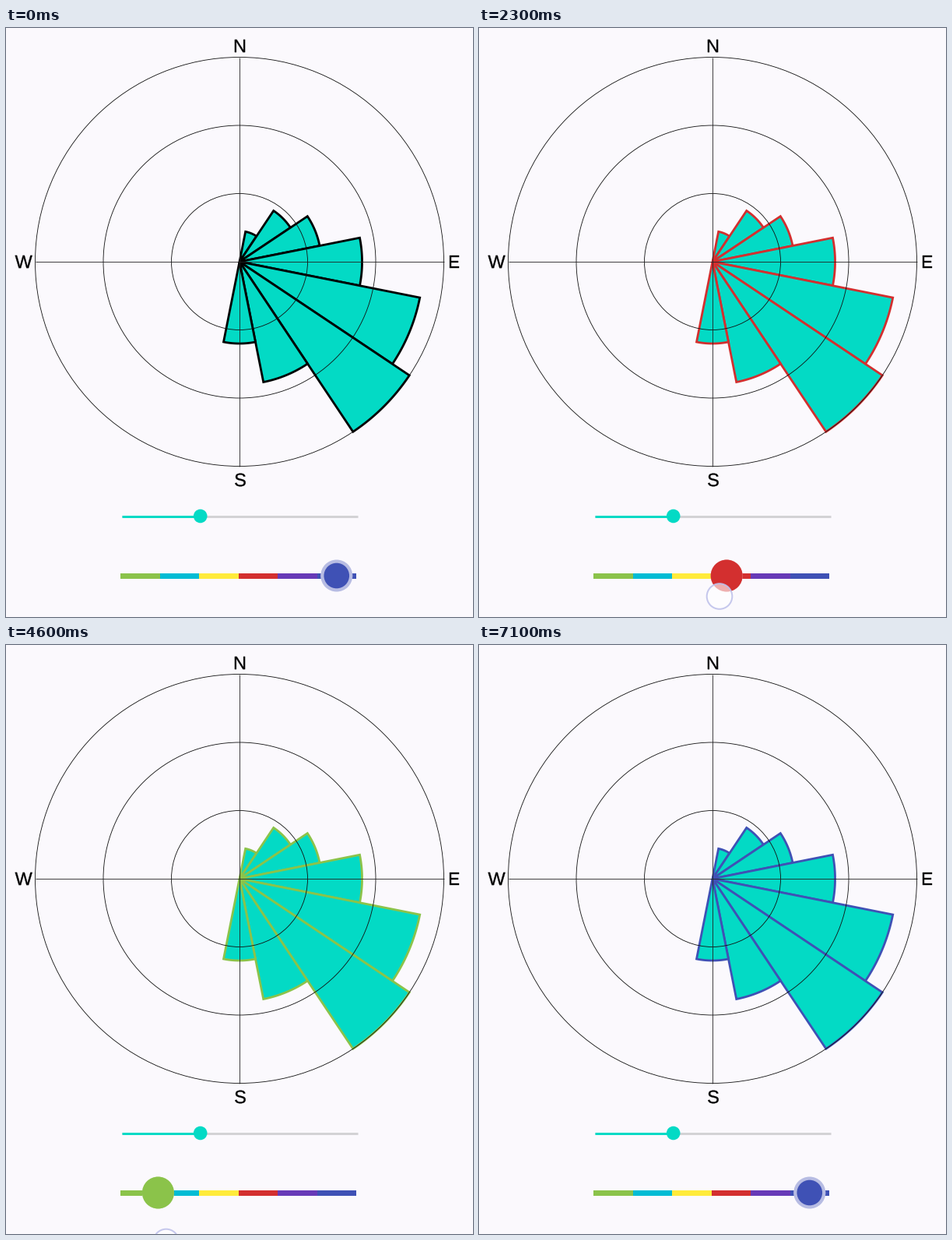
Animation of 600x756 px, one loop 9800 ms. Source, as a matplotlib script:

```python
import numpy as np
import matplotlib.pyplot as plt
from matplotlib.animation import FuncAnimation
from matplotlib.patches import Circle, PathPatch, Rectangle
from matplotlib.path import Path
from matplotlib.textpath import TextPath
from matplotlib.transforms import Affine2D

W, H, DPI = 600, 756, 100
FRAMES, STEP = 98, 100
PX = 72 / DPI  # one pixel in points

BG = "#fbf9fd"
TEAL = "#03dac5"
PALETTE = ["#8bc34a", "#00bcd4", "#ffeb3b", "#d32f2f", "#673ab7", "#3f51b5"]

CX, CY, R = 300, 300, 262.5
SECTOR = 22.5
VALUES = [0.15, 0.3, 0.4, 0.6, 0.9, 1.0, 0.6, 0.4]  # clockwise from NNE

TRACK_X, TRACK_Y, TRACK_W, TRACK_H = 147, 703, 303, 7
SEG = TRACK_W / len(PALETTE)
THUMB_MIN, THUMB_MAX = TRACK_X + SEG / 2, TRACK_X + TRACK_W - SEG / 2
THUMB_R, HALO_R = 16.3, 20.5

# Finger path: time in ms, x, y
TOUCH = np.array([
    (1200, 423.5, 690.5), (1300, 423.5, 692), (2300, 309, 729.5),
    (3100, 219, 753), (3600, 166, 763.5), (3800, 150, 767),
    (4000, 143, 769), (4100, 143, 769), (4400, 180, 768),
    (5100, 270, 761), (5400, 306, 757.5), (6100, 387, 745.5),
    (6400, 420, 740), (6700, 434, 737), (7000, 439, 736),
])
TOUCH_START, TOUCH_END, LAG = 1200, 7100, 80

fig = plt.figure(figsize=(W / DPI, H / DPI), dpi=DPI, facecolor=BG)
ax = fig.add_axes([0, 0, 1, 1])
ax.set_xlim(0, W)
ax.set_ylim(H, 0)
ax.axis("off")


def wedge_path(index, value):
    start = (index + 0.5) * SECTOR
    a = np.radians(np.linspace(start, start + SECTOR, 40))
    arc = np.column_stack([CX + value * R * np.sin(a), CY - value * R * np.cos(a)])
    return Path(np.vstack([(CX, CY), arc, (CX, CY)]))


def line(xs, ys, color, width, z):
    ax.plot(xs, ys, color=color, lw=width * PX, zorder=z, solid_capstyle="butt")


def disc(x, y, r, z, **style):
    return ax.add_patch(Circle((x, y), r, zorder=z, **style))


def letter(char, x, y, size=23.5):
    path = TextPath((0, 0), char, size=size, prop={"family": "Liberation Sans"})
    box = path.get_extents()
    mx, my = (box.x0 + box.x1) / 2, (box.y0 + box.y1) / 2
    move = Affine2D().translate(-mx, -my).scale(1, -1).translate(x, y)
    ax.add_patch(PathPatch(move.transform_path(path), fc="black", ec="black",
                           lw=0.35 * PX, zorder=5))


# Rose chart
wedges = []
for i, value in enumerate(VALUES):
    patch = PathPatch(wedge_path(i, value), fc=TEAL, ec="black", lw=2.8 * PX,
                      joinstyle="miter", capstyle="butt", zorder=2)
    wedges.append(ax.add_patch(patch))
for k in (1, 2, 3):
    disc(CX, CY, R * k / 3, 3, fill=False, ec="#111111", lw=0.85 * PX)
line([CX - R, CX + R], [CY, CY], "#222222", 0.85, 3)
line([CX, CX], [CY - R, CY + R], "#222222", 0.85, 3)
letter("N", 300.5, 23)
letter("E", 576, 300)
letter("S", 301, 580)
letter("W", 22.7, 300)

# Width slider
line([148.5, 451.5], [626.5, 626.5], "#d3d2d5", 3, 2)
line([148.5, 250], [626.5, 626.5], TEAL, 3, 3)
disc(249.7, 626.5, 8.8, 4, fc=TEAL, lw=0)

# Colour slider
for i, color in enumerate(PALETTE):
    ax.add_patch(Rectangle((TRACK_X + i * SEG, TRACK_Y - TRACK_H / 2), SEG, TRACK_H,
                           fc=color, lw=0, zorder=2))
halo_base = disc(THUMB_MAX, TRACK_Y, HALO_R, 3, fc=BG, lw=0)
halo = disc(THUMB_MAX, TRACK_Y, HALO_R, 4, lw=0, alpha=0.36)
thumb = disc(THUMB_MAX, TRACK_Y, THUMB_R, 5, lw=0)
finger = disc(0, 0, 16.3, 6, fc=(1, 1, 1, 0.62), ec=(0.75, 0.76, 0.92, 0.9), lw=2 * PX)


def touch_at(t):
    return np.interp(t, TOUCH[:, 0], TOUCH[:, 1]), np.interp(t, TOUCH[:, 0], TOUCH[:, 2])


def draw(frame):
    t = frame * STEP
    x = THUMB_MAX
    if t > TOUCH_START:
        x = np.clip(touch_at(t - LAG)[0], THUMB_MIN, THUMB_MAX)
        if t < 1400:
            x = THUMB_MAX
    color = PALETTE[int(round((x - THUMB_MIN) / SEG))]

    for disc_patch in (halo_base, halo, thumb):
        disc_patch.center = (x, TRACK_Y)
    halo.set_facecolor(color)
    thumb.set_facecolor(color)
    thumb.set_radius(np.interp(t, [1200, 1400, 6900, 7100],
                               [THUMB_R, HALO_R, HALO_R, THUMB_R]))

    finger.set_visible(TOUCH_START <= t < TOUCH_END)
    finger.center = touch_at(t)

    for patch in wedges:
        patch.set_edgecolor(color if t > TOUCH_START else "black")
    return [*wedges, halo_base, halo, thumb, finger]


anim = FuncAnimation(fig, draw, frames=FRAMES, interval=STEP, repeat=True,
                     repeat_delay=0, blit=False)
plt.show()
```
